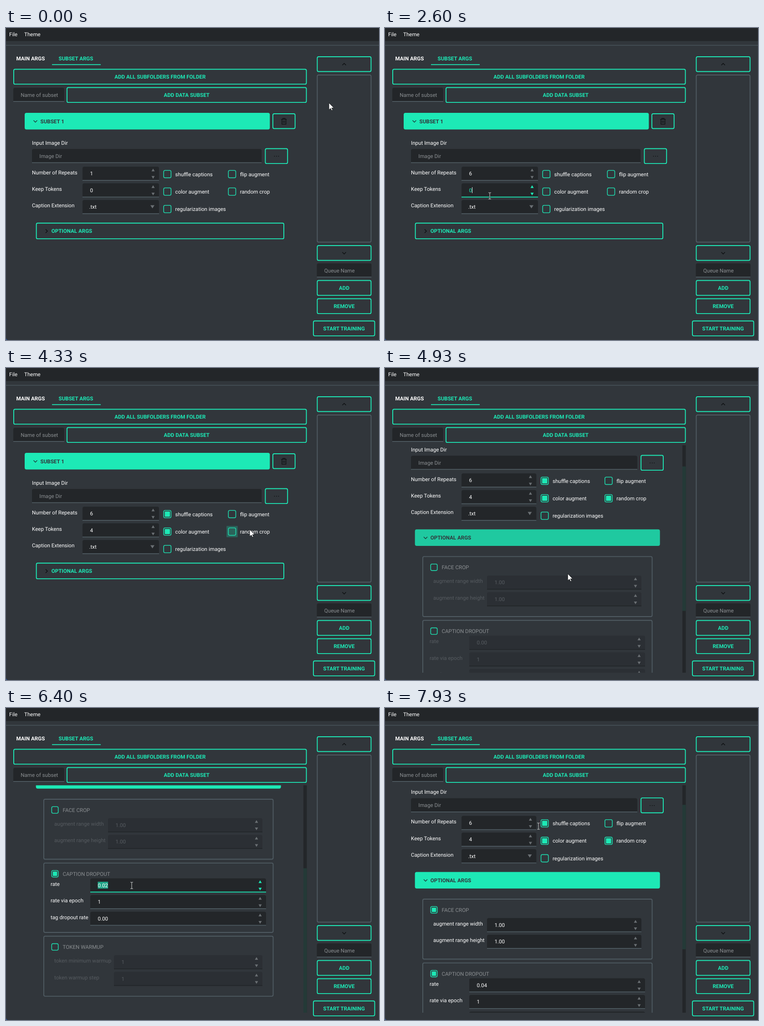
Animation, 819 px wide and 684 px high, one loop 8 s. Source, as an HTML page:

```html
<!DOCTYPE html>
<html lang="en">
<head>
<meta charset="utf-8">
<title>Subset arguments</title>
<style>
  html, body { margin: 0; width: 100%; height: 100%; overflow: hidden; background: #31363b; }
  svg { display: block; width: 819px; height: 684px; }
  text { font: 11.6px Roboto, "Open Sans", sans-serif; text-rendering: geometricPrecision; white-space: pre; }
  .b { font-weight: 700; }
</style>
</head>
<body>
<svg viewBox="0 0 819 684">
  <defs><clipPath id="view"><rect y="169.5" width="661" height="498.5"/></clipPath></defs>
  <g id="chrome"></g>
  <g clip-path="url(#view)"><g id="page"></g></g>
  <g id="bar"></g>
  <g id="pointer"></g>
</svg>
<script>
const GREEN = '#1de9b6', BG = '#31363b', DARK = '#232629', LINE = '#4f5b62';
const GREY = '#8b8f92', DIM = '#565b60', ARROW = '#6a6f73', INK = '#0c0e10';
const LOOP = 8000, STEP = 200 / 3;
const BTN = 34.5, FIELD = 31, ROW = 36.5, CHECK_ROW = 38.3, STROKE = 1.9;
const VIEW = { top: 169.5, height: 498.5, max: 286.4 };
const el = id => document.getElementById(id);

// Primitives
const rect = (x, y, w, h, fill, rx = 0, more = '') =>
  `<rect x="${x}" y="${y}" width="${w}" height="${h}" rx="${rx}" fill="${fill}" ${more}/>`;
const frame = (x, y, w, h, color = GREEN, sw = STROKE) =>
  rect(x + sw / 2, y + sw / 2, w - sw, h - sw, 'none', 3, `stroke="${color}" stroke-width="${sw}"`);
const text = (x, y, s, fill = '#fff', cls = '', anchor = 'start') =>
  `<text x="${x}" y="${y}" fill="${fill}" class="${cls}" text-anchor="${anchor}">${s}</text>`;
const path = (d, stroke, w = 1.4, fill = 'none') =>
  `<path d="${d}" stroke="${stroke}" stroke-width="${w}" fill="${fill}"/>`;
const move = (x, y, s, turn = 0) => `<g transform="translate(${x} ${y}) rotate(${turn})">${s}</g>`;
const triangle = (x, y, w, h, fill) => path(`M${x - w / 2} ${y - h / 2}h${w}l${-w / 2} ${h}z`, 'none', 0, fill);
const chevron = (x, y, turn, color = INK) => move(x, y, path('M-4 -2L0 2L4 -2', color), turn);

// Widgets
const button = (x, y, w, label = '') =>
  frame(x, y, w, BTN) + text(x + w / 2, y + 21.4, label, GREEN, 'b', 'middle');
const field = (x, y, w, fill = DARK, line = LINE) =>
  path(`M${x} ${y + FIELD}v-27q0 -4 4 -4h${w - 8}q4 0 4 4v27z`, 'none', 0, fill) +
  rect(x, y + FIELD - 1.8, w, 1.8, line);
const entry = (x, y, w, hint) => field(x, y, w) + text(x + 16.3, y + 19.5, hint, GREY);

function spin(x, y, w, value, on, focus) {
  const tx = x + 16.5, ax = x + w - 13, color = focus ? GREEN : ARROW;
  const width = [...value].reduce((sum, c) => sum + (c === '.' ? 3.05 : 6.51), 0);
  return field(x, y, w, on ? DARK : '#2b2f34', focus ? GREEN : on ? LINE : '#23272a') +
    (focus === 'select' ? rect(tx, y + 7.5, width, 15, '#20a587') : '') +
    text(tx, y + 19.3, value, focus === 'caret' ? GREEN : on ? '#fff' : DIM) +
    (focus === 'caret' ? rect(tx + width, y + 8.5, 1, 13, '#e8f5f1') : '') +
    triangle(ax, y + 7.3, 7, -6, color) + triangle(ax, y + 23.5, 7, 6, color);
}

const row = (lx, x, y, right, label, value, on, focus) =>
  text(lx, y + 16.5, label, on ? '#fff' : DIM) + spin(x, y, right - x, value, on, focus);

function check(x, y, size, on, hover) {
  const square = (half, fill, more) => rect(x - half, y - half, 2 * half, 2 * half, fill, 1, more);
  return (hover ? square(12.3, GREEN, 'opacity=".25"') : '') +
    frame(x - size / 2, y - size / 2, size, size, '#1fd6aa', 1.6) +
    (on ? square(size / 2 - 3.2, GREEN) : '');
}

// A titled box; its rows follow the shared row pitch
function group(y, g) {
  const height = 44.5 + g.rows.length * ROW + 2 * g.inset;
  let s = frame(82, y, 505.5, height, LINE) + check(107.5, y + 24.5, 16, g.on) + text(124.5, y + 29, g.title, GREY);
  g.rows.forEach(([label, value, focus], i) => {
    s += row(98 + g.inset, g.left, y + 34.5 + g.inset + i * ROW, 571 - g.inset, label, value, g.on, focus);
  });
  return [s, y + height + 6.4];
}

// Motion
const clamp = p => Math.min(1, Math.max(0, p));
const ease = p => p * p * (3 - 2 * p);
// Counts 1..n, the first at a and the last at b
const ticks = (t, a, b, n) => t < a ? 0 : 1 + Math.floor(clamp((t - a) / (b - a)) * (n - 1));

// Pointer moves: start, end, x, y
const moves = [
  [70, 800, 239, 309], [870, 1330, 234, 319], [1870, 2470, 230, 368], [3070, 3200, 232, 372],
  [3330, 3670, 355, 316], [3800, 3930, 362, 357], [3930, 4330, 535, 354], [4400, 4730, 402, 443],
  [4870, 5130, 396, 501], [5130, 5530, 106, 362], [5670, 5930, 276, 389],
  [6800, 7330, 104, 214], [7470, 7730, 337, 259]
];
const pointerAt = t => moves.reduce(([x, y], [a, b, tx, ty]) => {
  const p = ease(clamp((t - a) / (b - a)));
  return [x + (tx - x) * p, y + (ty - y) * p];
}, [709, 164]);

function stateAt(t) {
  const s = {
    repeats: ticks(t, 1470, 1800, 5), tokens: ticks(t, 2800, 3070, 4), rate: ticks(t, 6200, 6710, 4),
    shuffle: t >= 3670, color: t >= 3930, crop: t >= 4470,
    open: t >= 4800, pressed: t >= 4800 && t < 5200, drop: t >= 5600, face: t >= 7470
  };
  s.scroll = Math.min(VIEW.max, ticks(t, 4870, 5130, 4) * 73) - ticks(t, 7870, 7930, 3) * 73;
  s.active = t < 1000 ? '' : t < 2470 ? 'repeats' : t < 3670 ? 'tokens' : t >= 6070 && !s.face ? 'rate' : '';
  s.focus = name => s.active !== name ? '' : s[name] ? 'select' : 'caret';
  [s.x, s.y] = pointerAt(t);
  return s;
}

function drawChrome() {
  const col = 682.5, w = 120;
  el('chrome').innerHTML = [
    rect(0, 0, 819, 684, BG), rect(0, 0, 819, 28.5, DARK), rect(0, 37.3, 819, 1.2, LINE),
    text(7, 18.3, 'File'), text(40, 18.3, 'Theme'),
    text(22.5, 71.3, 'MAIN ARGS', '#fff', 'b'), text(115.5, 71.3, 'SUBSET ARGS', GREEN, 'b'),
    rect(101, 79.4, 107, 1.8, GREEN),
    button(16, 89.6, 644.5, 'ADD ALL SUBFOLDERS FROM FOLDER'),
    entry(16, 131, 112, 'Name of subset'), button(133, 129.6, 527.5, 'ADD DATA SUBSET'),
    button(col, 62, w), chevron(742.5, 79.5, 180),
    frame(col, 102, w, 368.5, LINE),
    button(col, 476, w), chevron(742.5, 493.5, 0),
    entry(col, 516, w, 'Queue Name'),
    button(col, 552.6, w, 'ADD'), button(col, 592.6, w, 'REMOVE'), button(674, 641.3, 136.5, 'START TRAINING'),
    path('M0 679.5Q0.5 683.5 4 684H0z', 'none', 0, '#2a55a0')
  ].join('');
}

const trash = path('M-6 -4.3H6M-2.5 -4.3V-6.3H2.5V-4.3M-4.5 -4.3V6.3H4.5V-4.3M-1.6 -1.5V3.7M1.6 -1.5V3.7', INK, 1.2);
const dots = [-4.5, 0, 4.5].map(d => rect(d - 0.75, -0.75, 1.5, 1.5, INK)).join('');

function drawOptions(s) {
  const dim = '1.00';
  const groups = [
    { title: 'FACE CROP', on: s.face, inset: 8, left: 224,
      rows: [['augment range width', dim], ['augment range height', dim]] },
    { title: 'CAPTION DROPOUT', on: s.drop, inset: 0, left: 185,
      rows: [['rate', (s.rate / 100).toFixed(2), s.focus('rate')], ['rate via epoch', '1'], ['tag dropout rate', '0.00']] },
    { title: 'TOKEN WARMUP', on: false, inset: 8, left: 237,
      rows: [['token minimum warmup', '1'], ['token warmup step', '1']] }
  ];
  let out = '', y = 485.4, part;
  for (const g of groups) {
    [part, y] = group(y, g);
    out += part;
  }
  return out;
}

function drawPage(s) {
  const cut = s.open ? 7.3 : 0, right = 336 - cut / 2;   // room taken by the scrollbar
  let out = rect(41, 186, 538.3 - cut, 36.5, GREEN, 4) + chevron(64.5, 204.5, 0, '#1d3a38') +
    text(75.5, 208.8, 'SUBSET 1', BG, 'b') +
    button(585 - cut, 187, 50.7) + move(610.3 - cut, 204.5, trash) +
    text(57, 255.5, 'Input Image Dir') + entry(57, 265.2, 504.3 - cut, 'Image Dir') +
    button(568.5 - cut, 263.6, 50.7) + move(594 - cut, 281.2, dots) +
    row(57, 168, 304, right, 'Number of Repeats', `${1 + s.repeats}`, true, s.focus('repeats')) +
    row(57, 168, 304 + ROW, right, 'Keep Tokens', `${s.tokens}`, true, s.focus('tokens')) +
    text(57, 393.3, 'Caption Extension') + field(168, 304 + 2 * ROW, right - 168) +
    text(182.5, 396, '.txt') + triangle(right - 14.5, 392, 9, 7, ARROW);

  const columns = [
    [354.3 - cut / 2, [['shuffle captions', s.shuffle], ['color augment', s.color], ['regularization images', false]]],
    [496.4 - cut * .75, [['flip augment', false], ['random crop', s.crop]]]
  ];
  for (const [x, boxes] of columns) boxes.forEach(([label, on], i) => {
    const y = 320.3 + i * CHECK_ROW;
    const hover = s.x > x - 9 && s.x < x + 95 && Math.abs(s.y + s.scroll - y) < 10;
    out += check(x, y, 17.8, on, hover) + text(x + 17.3, y + 4.3, label);
  });

  out += s.open ? rect(65.7, 426.8, 538, 36.3, s.pressed ? '#1fc9a0' : GREEN, 4) : frame(65.7, 426.8, 545.3, 36.3);
  out += chevron(89, 445.2, s.open ? 0 : -90, s.open ? '#1d3a38' : INK);
  out += text(99.7, 449.4, 'OPTIONAL ARGS', s.open ? BG : GREEN, 'b');
  if (s.open) out += drawOptions(s);
  el('page').innerHTML = move(0, -s.scroll, out);

  const k = VIEW.height / (VIEW.height + VIEW.max);
  el('bar').innerHTML = !s.open ? '' : rect(653, VIEW.top, 7.5, VIEW.height, DARK) +
    rect(653, VIEW.top + s.scroll * k, 7.5, VIEW.height * k, '#243a37');
}

function drawPointer(s) {
  // The shape is kept while the wheel scrolls beneath it
  const y = s.y + (s.open ? VIEW.max : 0);
  const over = (l, top, r, b) => s.x > l && s.x < r && y > top && y < b;
  const beam = over(57, 265, 561, 297) || over(168, 304, 320, 371) ||
    (s.drop && over(185, 660, 548, 764)) || (s.face && over(224, 527, 540, 595));
  const arrow = 'M0 0V15.5L3.6 12.2L6 17.2L8.4 16.1L6.1 11.3H11z';
  const bar = 'M-3 -7H-1Q0 -7 0 -6Q0 -7 1 -7H3M0 -6V6M-3 7H-1Q0 7 0 6Q0 7 1 7H3';
  el('pointer').innerHTML = move(s.x, s.y,
    beam ? path(bar, '#15181a', 2.2) + path(bar, '#d8dadb', 1.1) : path(arrow, '#15181a', 1, '#fff'));
}

let last = -1;
function loop() {
  const tick = Math.floor((performance.now() % LOOP + 5) / STEP) % 120;
  if (tick !== last) {
    last = tick;
    const s = stateAt(Math.round(tick * STEP / 10) * 10);
    drawPage(s);
    drawPointer(s);
  }
  requestAnimationFrame(loop);
}
drawChrome();
loop();
</script>
</body>
</html>
```
